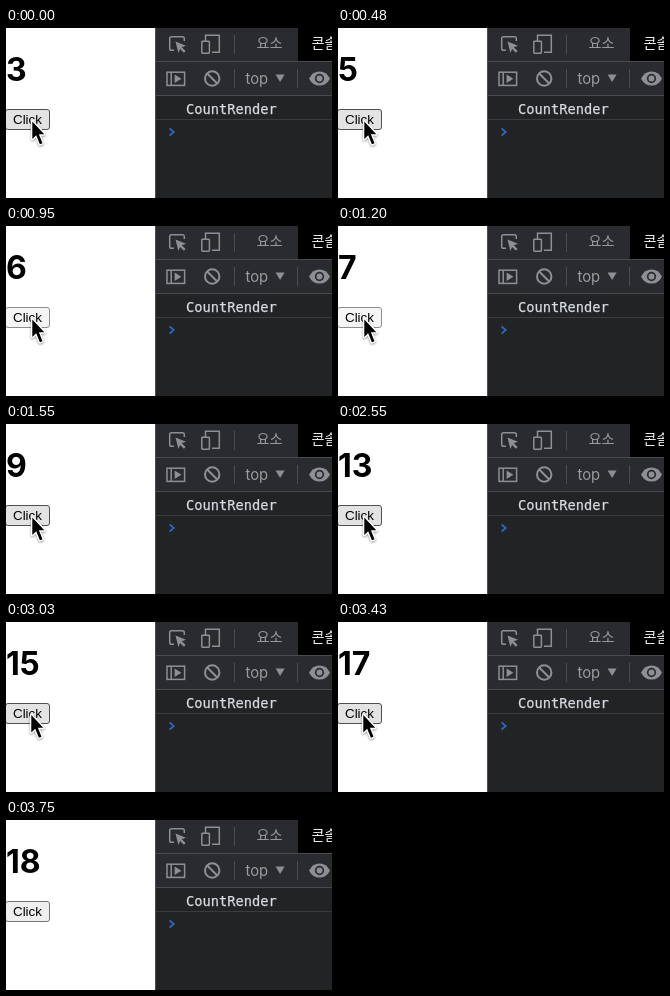
These frames come from a looping animation (326x170 px, 4.56 s). An HTML page:

```html
<!DOCTYPE html>
<html lang="ko">
<head>
<meta charset="utf-8">
<title>Click counter</title>
<style>
  html, body { margin: 0; width: 100%; height: 100%; overflow: hidden; background: #fff; }
  svg { display: block; width: 326px; height: 170px; }
  #count { font: 700 32px Inter, sans-serif; }
  #cursor { filter: drop-shadow(0 1px 1.2px rgba(0, 0, 0, .4)); }
  .label { font: 13.333px "Liberation Sans", Arial, sans-serif; }
  .tab { font: 500 14.2px "Noto Sans CJK KR", "Noto Sans CJK", sans-serif; }
  .top { font: 14.8px Inter, sans-serif; fill: #9a9c9f; }
  .log { font: 13.7px "DejaVu Sans Mono", monospace; fill: #d5dae0; stroke: #d5dae0; stroke-width: .25; }
  .icon { fill: none; stroke: #8d8f92; stroke-width: 1.5; }
  .rule { stroke: #4a4b4e; }
</style>
</head>
<body>
<svg viewBox="0 0 326 170">
  <rect width="326" height="170" fill="#fff"/>
  <text id="count" x="0" y="52.6">3</text>
  <g id="button">
    <rect x="-.5" y="81.5" width="44" height="20" rx="2.5"/>
    <text class="label" x="7" y="96">Click</text>
  </g>

  <g id="devtools">
    <rect x="149" width="177" height="170" fill="#212325"/>
    <rect x="149" width="177" height="67" fill="#2a2b2e"/>
    <rect x="292" width="34" height="33" fill="#000"/>
    <path class="rule" d="M149.5 0V170M150 33.5H326M150 67.5H326M228.5 7V26M228.5 41V60M291.5 41V60"/>
    <path d="M150 91.5H326" stroke="#3a3c40"/>

    <g class="icon">
      <path d="M168 22.2H165.5Q163.7 22.2 163.7 20.4V10.6Q163.7 8.8 165.5 8.8H176.5Q178.3 8.8 178.3 10.6V13"/>
      <path d="M199.5 13V7.2H213.3V24.2H206"/>
      <rect x="195.8" y="13.2" width="7.6" height="12" rx=".6"/>
      <rect x="161" y="44.2" width="17.6" height="13.2"/>
      <path d="M165.2 44V57.4"/>
      <g stroke-width="2">
        <circle cx="206.2" cy="50.5" r="7.2"/>
        <path d="M201.2 45.5L211.2 55.5"/>
      </g>
    </g>
    <g fill="#8d8f92">
      <path d="M169.5 13.5L180 17.7L175.8 19.2L179.6 23L177.9 24.7L174.1 20.9L172.4 25Z"/>
      <path d="M168.6 46.6L175.4 50.8L168.6 55Z"/>
      <path d="M269.6 46.6H278.6L274.1 54Z"/>
      <path d="M303 50.5Q306.5 43.4 313.5 43.4T324 50.5Q320.5 57.6 313.5 57.6T303 50.5Z"/>
    </g>
    <circle cx="313.5" cy="50.5" r="3.8" fill="#8d8f92" stroke="#2a2b2e" stroke-width="1.7"/>

    <text class="tab" x="250.5" y="20.3" fill="#9a9c9f">요소</text>
    <text class="tab" x="305.5" y="20.3" fill="#f1f3f4">콘솔</text>
    <text class="top" x="239.5" y="55.5">top</text>
    <text class="log" x="180" y="86">CountRender</text>
    <path d="M163.6 100.3L167.7 104L163.6 107.7" fill="none" stroke="#3068c0" stroke-width="1.8"/>
  </g>

  <path id="cursor" d="M0 0V17.4L3.9 13.8L7.6 22.8L10.2 21.7L6.6 12.8H12Z"
        fill="#000" stroke="#fff" stroke-width="2.8" stroke-linejoin="round" paint-order="stroke"/>
</svg>
<script>
const LOOP = 4560;

// [fill, border] of the button
const looks = {
  hover: ['#e3e3e3', '#4f4f4f'],
  active: ['#f5f5f5', '#8d8d8d'],
  idle: ['#efefef', '#767676']
};

// time, count, look
const steps = [
  [0, 3, 'hover'], [50, 3, 'active'], [150, 3, 'hover'], [230, 4, 'hover'],
  [400, 4, 'active'], [480, 5, 'hover'], [650, 5, 'active'], [750, 6, 'hover'],
  [950, 6, 'active'], [1000, 6, 'hover'], [1050, 7, 'hover'], [1180, 7, 'active'],
  [1280, 8, 'hover'], [1400, 8, 'active'], [1550, 9, 'hover'], [1650, 9, 'active'],
  [1730, 10, 'hover'], [2000, 10, 'active'], [2080, 11, 'hover'], [2250, 11, 'active'],
  [2330, 12, 'hover'], [2450, 12, 'active'], [2550, 13, 'hover'], [2650, 13, 'active'],
  [2750, 14, 'hover'], [2850, 14, 'active'], [2930, 14, 'hover'], [3030, 15, 'hover'],
  [3150, 15, 'active'], [3250, 16, 'hover'], [3350, 16, 'active'], [3430, 17, 'hover'],
  [3500, 17, 'active'], [3560, 18, 'hover'], [3650, 18, 'idle']
];

// time, x, y of the pointer tip
const moves = [
  [0, 26.3, 93.5], [2930, 25.3, 93], [3610, 30, 91], [3650, 92, 78], [3700, 272, 55], [3750, 400, 40]
];

const $ = id => document.getElementById(id);
const box = $('button').firstElementChild;
const at = (table, t) => table.findLast(row => row[0] <= t);

function draw(t) {
  const [, count, look] = at(steps, t);
  const [, x, y] = at(moves, t);
  const [fill, border] = looks[look];
  $('count').textContent = count;
  box.setAttribute('fill', fill);
  box.setAttribute('stroke', border);
  $('cursor').setAttribute('transform', `translate(${x} ${y})`);
}

const start = performance.now();
function tick() {
  draw((performance.now() - start) % LOOP);
  requestAnimationFrame(tick);
}
tick();
</script>
</body>
</html>
```
